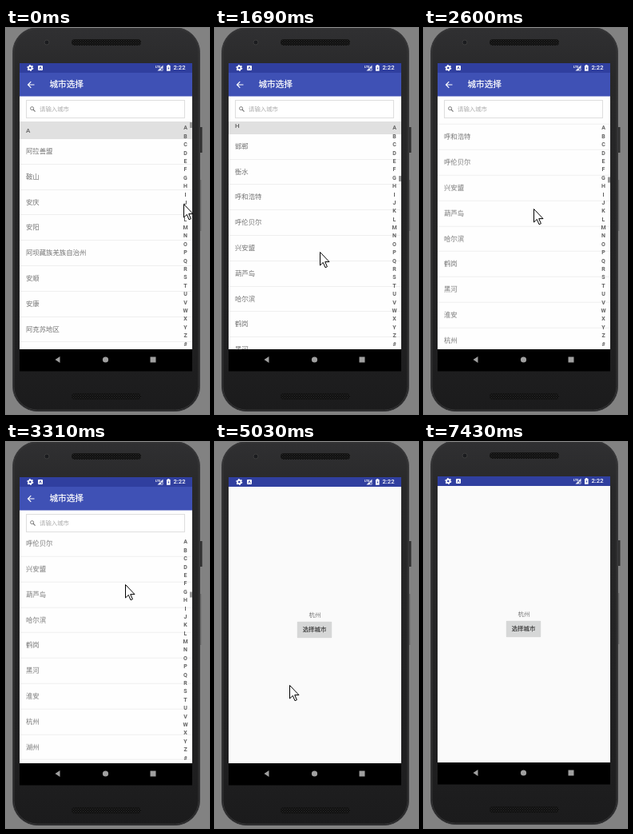
An HTML page that plays this animation: 254x483 px, repeating every 8150 ms.

```html
<!DOCTYPE html>
<html>
<head>
<meta charset="utf-8">
<title>City picker</title>
<style>
html, body { margin: 0; width: 100%; height: 100%; overflow: hidden; background: #828282; }
body { position: relative; font-family: Roboto, "Noto Sans CJK SC", "Noto Sans CJK", sans-serif; }
div, svg { position: absolute; box-sizing: border-box; white-space: nowrap; }
svg { left: 0; top: 0; overflow: visible; }

#phone { left: 0; top: 0; width: 254px; height: 483px; }
#screen { left: 17px; top: 56px; width: 216px; height: 346px; overflow: hidden; background: #fafafa; }
#picker { left: 0; top: 0; width: 216px; height: 346px; background: #fefefe; }
#bar { left: 0; top: 0; width: 216px; height: 29px; background: #3f51b5; box-shadow: 0 1px #a0a8da; }
#title { left: 37.5px; top: 0; line-height: 30px; font-size: 10.6px; color: #fff; -webkit-text-stroke: .25px #fff; }
#search { left: 8px; top: 34px; width: 199px; height: 23px; border: 1px solid #dedede; background: #fff;
  padding-left: 16px; line-height: 21px; font-size: 7.4px; color: #acacac; }
#view { left: 0; top: 61px; width: 216px; height: 285px; overflow: hidden; }
#list { left: 0; top: 0; width: 216px; border-top: 1px solid #e0e0e0; }
#list div { position: static; padding-left: 8px; }
#list .head { height: 21px; line-height: 21px; background: #e0e0e0; font-size: 8px; font-weight: 500; color: #606060; }
#list .row { height: 31.8px; line-height: 31.8px; border-bottom: 1px solid #efefef; font-size: 8.4px; color: #747474; }
#index { left: 200px; top: 64.4px; width: 15px; text-align: center; font-size: 7px; font-weight: 700;
  line-height: 10.39px; color: #606060; white-space: pre; }
#thumb { left: 213px; top: 0; width: 3px; height: 7px; background: #999; }
#city { left: 0; top: 155px; width: 216px; text-align: center; line-height: 12px; font-size: 7.4px; color: #757575; }
#button { left: 86px; top: 169px; width: 43px; height: 20px; border-radius: 1px; background: #d6d7d7;
  box-shadow: 0 0 1px #bbb; text-align: center; line-height: 19px; font-size: 7.4px; color: #333;
  -webkit-text-stroke: .15px #333; }
#clock { left: 209.5px; top: 44px; line-height: 12px; font-size: 7.6px; font-weight: 500; color: #fff; }

#phone, #list, #thumb, #hit, #picker, #cursor { animation: 8150ms step-end infinite; }
#phone { animation-name: nudge; }
#list { animation-name: scroll; }
#thumb { animation-name: thumb; }
#picker { animation-name: close; }
#list #hit { animation-name: press; }
#cursor { animation-name: move; }

@keyframes nudge { 0% { translate: 0 0; } 91.16%, 100% { translate: 0 -1px; } }
@keyframes press { 0% { background: none; } 54.35% { background: #dfdfdf; } 56.56%, 100% { background: none; } }
@keyframes close {
  0% { opacity: 1; translate: 0 0; visibility: visible; }
  58.77% { opacity: .8; translate: 0 5px; }
  59.87% { opacity: .35; translate: 0 18px; }
  60.98%, 100% { opacity: 0; translate: 0 28px; visibility: hidden; }
}
@keyframes scroll {
  0% { translate: 0 0; }
  15.21% { translate: 0 -154px; }
  16.31% { translate: 0 -520px; }
  17.42% { translate: 0 -900px; }
  18.52% { translate: 0 -1290px; }
  19.63% { translate: 0 -1542px; }
  21.84% { translate: 0 -1548px; animation-timing-function: steps(3); }
  24.66% { translate: 0 -1572px; }
  25.76% { translate: 0 -1580px; animation-timing-function: steps(6); }
  31.9% { translate: 0 -1617.3px; animation-timing-function: steps(3); }
  35.09% { translate: 0 -1632px; }
  36.19% { translate: 0 -1636px; animation-timing-function: steps(4); }
  40.61% { translate: 0 -1658.3px; animation-timing-function: steps(4); }
  44.66% { translate: 0 -1686px; }
  46.5% { translate: 0 -1691px; animation-timing-function: steps(2); }
  48.71%, 100% { translate: 0 -1695.6px; }
}
@keyframes thumb {
  0% { translate: 0 62px; }
  15.21% { translate: 0 69px; }
  16.31% { translate: 0 85px; }
  17.42% { translate: 0 101px; }
  18.52% { translate: 0 118px; }
  19.63% { translate: 0 129px; }
  31.9% { translate: 0 130.5px; }
  40.61% { translate: 0 131.5px; }
  48.71%, 100% { translate: 0 133px; }
}
@keyframes move {
  0% { translate: 222px 220px; }
  1.1% { translate: 222px 204px; animation-timing-function: steps(6); }
  7.23% { translate: 227px 119px; }
  15.21% { translate: 226px 128px; animation-timing-function: steps(3); }
  18.52% { translate: 225px 184px; }
  19.63% { translate: 180px 233px; }
  20.73% { translate: 131px 280px; }
  21.84% { translate: 131px 278px; animation-timing-function: steps(3); }
  24.66% { translate: 133px 262px; }
  25.76% { translate: 133px 257px; animation-timing-function: steps(6); }
  31.9% { translate: 137px 226px; animation-timing-function: steps(3); }
  35.09% { translate: 142px 208px; }
  36.19% { translate: 143px 204px; animation-timing-function: steps(4); }
  40.61% { translate: 149px 178px; animation-timing-function: steps(4); }
  44.66% { translate: 146px 150px; }
  46.5% { translate: 130px 215px; animation-timing-function: steps(2); }
  48.71% { translate: 90px 309px; }
  50.92% { translate: 89px 310px; }
  58.77% { translate: 90px 308px; animation-timing-function: steps(3); }
  61.71% { translate: 93px 304px; animation-timing-function: steps(2); }
  63.92% { translate: 96px 303px; }
  66.99% { translate: 110px 307px; animation-timing-function: steps(7); }
  74.72% { translate: 260px 366px; }
  81.22% { translate: 237px 464px; animation-timing-function: steps(2); }
  83.43% { translate: 224px 431px; animation-timing-function: steps(3); }
  86.25%, 100% { translate: 221px 490px; }
}
</style>
</head>
<body>
<div id="phone">
  <svg width="254" height="483">
    <defs>
      <linearGradient id="shell" x2="0" y2="1">
        <stop stop-color="#303032"/><stop offset=".13" stop-color="#282829"/>
        <stop offset=".85" stop-color="#1f1f20"/><stop offset="1" stop-color="#1b1b1c"/>
      </linearGradient>
      <pattern id="mesh" width="3" height="3" patternUnits="userSpaceOnUse">
        <path d="M0 0h3v3H0z" fill="#101010"/><path d="M0 0h1v1H0zM1.5 1.5h1v1h-1z" fill="#2a2a2a"/>
      </pattern>
    </defs>
    <path d="M242 124h3.5v32H242z" fill="#303030"/>
    <path d="M242 190h2.3v64H242z" fill="#686868"/>
    <rect x="8.5" y="-.5" width="234" height="480" rx="31" fill="url(#shell)" stroke="#3c3c3e"/>
    <rect x="10" y="1" width="231" height="477" rx="29.5" fill="none" stroke="#363637"/>
    <rect x="82" y="14" width="87" height="8" rx="4" fill="url(#mesh)"/>
    <rect x="82" y="457" width="87" height="8" rx="4" fill="url(#mesh)"/>
    <circle cx="51" cy="18" r="3" fill="#1b1c1f" stroke="#3c3c3c"/>
    <path d="M17 44h216v12H17z" fill="#303f9f"/>
    <path d="M17 402h216v27.5H17z"/>
    <g fill="#a0a0a0">
      <path d="M61.5 415l6-4v8z"/><circle cx="124.5" cy="415" r="3.6"/><path d="M180.5 411.5h7v7h-7z"/>
    </g>
    <g fill="#fff">
      <circle cx="30.3" cy="50" r="2.2" fill="none" stroke="#fff" stroke-width="1.8"/>
      <circle cx="30.3" cy="50" r="3.4" fill="none" stroke="#fff" stroke-width="1.3" stroke-dasharray="1.8 1.76"/>
      <rect x="40" y="47" width="6" height="6" rx="1"/>
      <path d="M41.6 51.8L43 48.4l1.4 3.4" fill="none" stroke="#303f9f" stroke-width=".8"/>
      <path d="M189.5 53.5l7-7v7z" opacity=".9"/>
      <path d="M193.5 50l3 3.5M196.5 50l-3 3.5" stroke="#303f9f" stroke-width=".8"/>
      <text x="187" y="49.5" font-size="4" font-weight="700">LTE</text>
      <path d="M201 47h1.2v-1h2.2v1h1.2v6.8H201z"/>
      <path d="M203.7 48l-1.5 2.6h1l-.3 2 1.5-2.7h-1z" fill="#303f9f"/>
    </g>
  </svg>
  <div id="clock">2:22</div>
  <div id="screen">
    <div id="city">杭州</div>
    <div id="button">选择城市</div>
    <div id="picker">
      <div id="view"><div id="list"></div></div>
      <div id="bar"></div>
      <div id="title">城市选择</div>
      <div id="search">请输入城市</div>
      <svg width="216" height="60" fill="none">
        <path d="M18.5 15H10.5M14.3 11.2L10.5 15l3.8 3.8" stroke="#fff" stroke-width="1.2"/>
        <circle cx="15.6" cy="44.6" r="2" stroke="#7c7c7c"/><path d="M17 46l2.6 2.6" stroke="#7c7c7c" stroke-width="1.2"/>
      </svg>
      <div id="index"></div>
      <div id="thumb"></div>
    </div>
  </div>
</div>
<svg id="cursor" width="13" height="21">
  <path d="M.5 .5V17L4.3 13.4 7 19.7l2.4-1-2.7-6.1H12z" fill="#fff" stroke="#000"/>
</svg>
<script>
const cities = {
  A: '阿拉善盟 鞍山 安庆 安阳 阿坝藏族羌族自治州 安顺 安康 阿克苏地区 阿勒泰地区',
  B: '保定 包头 巴彦淖尔 本溪 白山 白城 蚌埠 亳州 滨州',
  C: '承德 沧州 长治 赤峰 朝阳 长春 常州 滁州 池州',
  D: '大同 大连 丹东 大庆 大兴安岭地区 东营 德州 东莞 德阳',
  G: '赣州 广州 桂林 贵港 广元 广安 甘孜藏族自治州 贵阳 固原',
  H: '邯郸 衡水 呼和浩特 呼伦贝尔 兴安盟 葫芦岛 哈尔滨 鹤岗 黑河 淮安 杭州 湖州 合肥 淮南 淮北'
};
const list = document.getElementById('list');
const add = (type, text) => {
  const el = document.createElement('div');
  el.className = type;
  el.textContent = text;
  return list.appendChild(el);
};
for (const [letter, names] of Object.entries(cities)) {
  add('head', letter);
  for (const name of names.split(' ')) {
    const row = add('row', name);
    if (name === '杭州') row.id = 'hit';
  }
}
document.getElementById('index').textContent = [...'ABCDEFGHIJKLMNOPQRSTUVWXYZ#'].join('\n');
</script>
</body>
</html>
```
